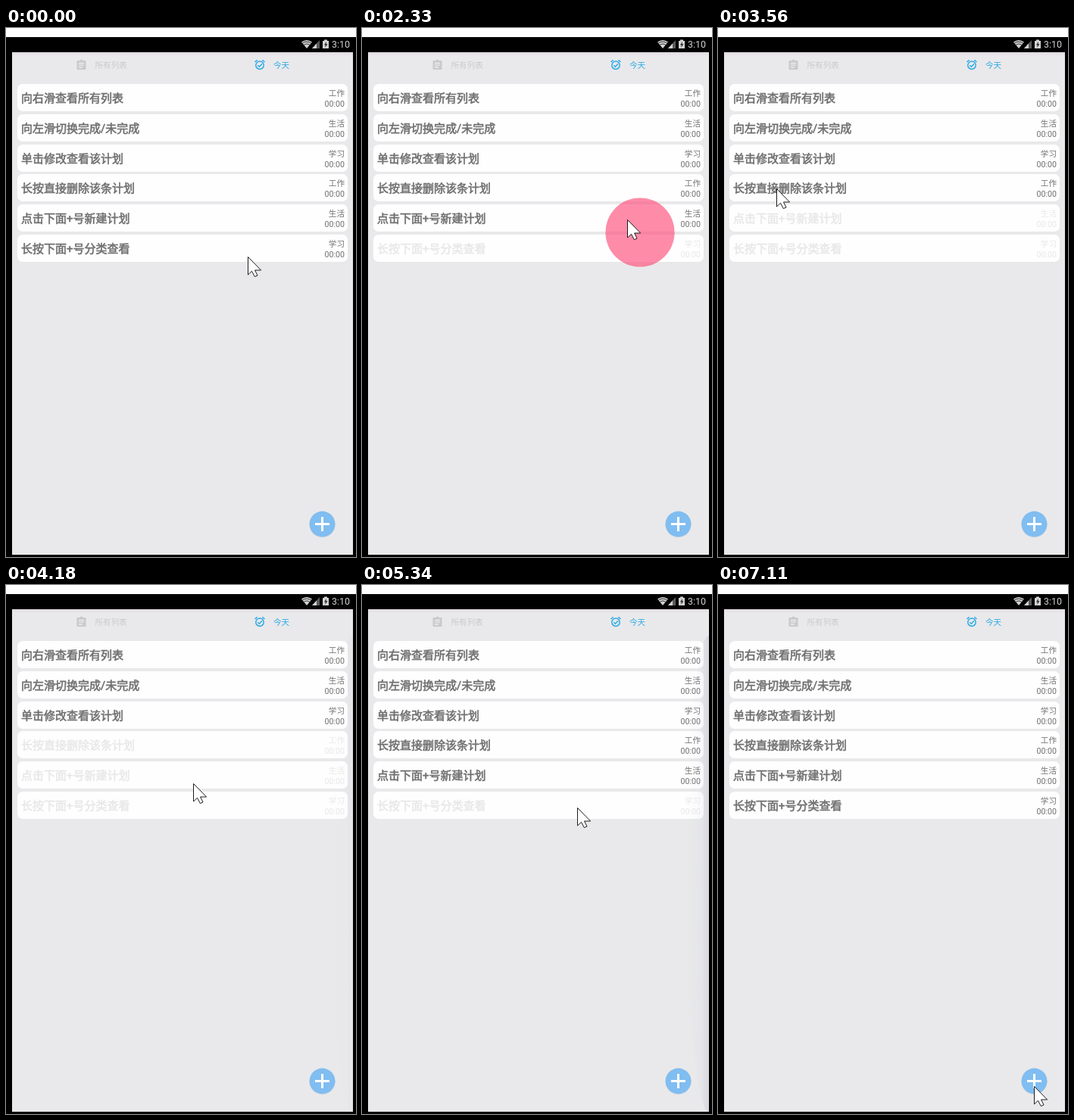
An HTML page that plays this animation: 462x699 px, repeating every 8 s.

```html
<!DOCTYPE html>
<html lang="zh">
<head>
<meta charset="utf-8">
<style>
  html, body { margin: 0; width: 100%; height: 100%; overflow: hidden; background: #000; }
  svg { display: block; font-family: Roboto, "Noto Sans CJK SC", "Noto Sans CJK", sans-serif; }
  .title { font-size: 15px; stroke: currentColor; stroke-width: .6; }
  .small { font-size: 10.6px; }
  .end { text-anchor: end; }
  .line { fill: none; stroke-width: 1.5; }
  .words { fill: currentColor; }
</style>
</head>
<body>
<svg width="462" height="699" viewBox="0 0 462 699">
  <defs>
    <linearGradient id="edge" gradientUnits="userSpaceOnUse" x1="428" x2="458" y1="0" y2="0">
      <stop stop-color="#a4abc0" stop-opacity="0"/>
      <stop offset=".65" stop-color="#a4abc0" stop-opacity=".12"/>
      <stop offset="1" stop-color="#8f98b0" stop-opacity=".45"/>
    </linearGradient>
    <linearGradient id="shade" x2="0" y2="1">
      <stop stop-color="#e2dae1"/>
      <stop offset="1" stop-color="#e9e9eb"/>
    </linearGradient>
  </defs>
  <rect width="462" height="12" fill="#fefefe"/>
  <rect x="8" y="32" width="450" height="664" fill="#e9e9eb"/>
  <rect x="8" y="32" width="450" height="5" fill="url(#shade)"/>

  <!-- status bar -->
  <g fill="#d2d2d2">
    <path d="M390 18.6Q397 13.2 404 18.6L397 27Z"/>
    <path d="M391 20.3Q397 15.8 403 20.3M393 22.6Q397 19.4 401 22.6" fill="none" stroke="#333"/>
    <path d="M404 27L414 16V27Z" fill="#5c5c5c"/>
    <path d="M404 27L410 20.4V27Z"/>
    <path d="M418 17H420V15.5H424V17H426V27H418Z"/>
    <path d="M423 18L420 22.5H422L421 26L424.5 21.3H422.5Z" fill="#222"/>
    <text x="454" y="26" class="end" font-size="12.4">3:10</text>
  </g>

  <!-- tabs -->
  <g fill="#cacacd">
    <path d="M94.5 43H97.5Q99.5 40.2 101.5 43H104.5Q105.5 43 105.5 44V54Q105.5 55 104.5 55H94.5Q93.5 55 93.5 54V44Q93.5 43 94.5 43Z"/>
    <path d="M96 46.5H103M96 49.2H103M96 52H101" stroke="#ececee" stroke-width="1.3"/>
    <text x="117.5" y="52.7" class="small">所有列表</text>
  </g>
  <g fill="#2eaae6" stroke="#2eaae6">
    <circle cx="335" cy="49.2" r="5.2" class="line"/>
    <path d="M332.3 49.2L334.4 51.2L338 47.3M328.5 45L331.6 42.4M341.5 45L338.4 42.4" class="line"/>
    <text x="353" y="52.7" class="small" stroke="none">今天</text>
  </g>

  <g id="rows"></g>
  <ellipse id="glow" cx="458" cy="381.5" rx="30" ry="314.5" fill="url(#edge)"/>
  <path d="M458 31H462V699H458Z"/>

  <!-- add button -->
  <circle cx="417.5" cy="656" r="17.2" fill="#d3d7dc"/>
  <circle cx="417.5" cy="655.5" r="16.9" fill="#80bdf1"/>
  <path d="M408 655.5H427M417.5 646V665" stroke="#fff" stroke-width="3"/>

  <g id="pointer">
    <circle id="press" cx="17" cy="17" r="45.6" fill="#ff4070" fill-opacity=".6"/>
    <path d="M.5 .5V24L5.5 19.3L9.3 26.6L13 25L9.5 18H17.6Z" fill="#fff" stroke="#1c1c1c"/>
  </g>
</svg>
<script>
const LOOP = 8000, STEP = 77.3;     // the screen refreshes once per step
const ROW_TOP = 74, PITCH = 39.75;
const PRESS_X = 350, SWIPE_STEPS = 3, SPEED = 25;
const titles = ['向右滑查看所有列表', '向左滑切换完成/未完成', '单击修改查看该计划',
                '长按直接删除该条计划', '点击下面+号新建计划', '长按下面+号分类查看'];
const kinds = ['工作', '生活', '学习'];

// each swipe runs left from PRESS_X and ends at [step, x, y]
const swipes = [[4, 240, 291], [22, 130, 253], [35, 77, 212],
                [43, 247, 262], [53, 250, 212], [58, 284, 294]];
const toggles = swipes.map(([step, , y]) => ({ step: step + 1, row: Math.floor((y - ROW_TOP) / PITCH) }));
const path = [
  { step: -2, x: 319, y: 302 },
  { step: -1, x: 335, y: 300 },
  ...swipes.flatMap(([step, x, y]) => [{ step: step - SWIPE_STEPS, x: PRESS_X, y, down: true }, { step, x, y }]),
  { step: 75, x: 416, y: 661, down: true },
  { step: 76, x: 417, y: 662 }
];
const $ = id => document.getElementById(id);

$('rows').innerHTML = titles.map((title, i) => `
  <g transform="translate(0 ${Math.round(ROW_TOP + PITCH * i)})">
    <rect x="15" width="436" height="36" rx="7" fill="#fefefe"/>
    <g class="words">
      <text x="20" y="24" class="title">${title}</text>
      <text x="447" y="15.5" class="small end">${kinds[i % 3]}</text>
      <text x="447" y="29.8" class="small end">00:00</text>
    </g>
  </g>`).join('');
const words = document.querySelectorAll('.words');

function stepAt(t) {
  if (t < 70) return -2;
  if (t < 870) return -1;
  if (t >= 7110) return 76;
  return Math.min(75, Math.floor((t - 850) / STEP));
}

// Swipes are linear; moves between them slow down and then wait for the next press.
function pointerAt(step) {
  const a = path.findLast(p => p.step <= step);
  const b = path.find(p => p.step > step) || a;
  const gap = b.step - a.step || 1;
  const travel = Math.min(gap, Math.hypot(b.x - a.x, b.y - a.y) / SPEED);
  const f = a.down ? (step - a.step) / gap : 1 - (1 - Math.min(1, (step - a.step) / travel || 0)) ** 2;
  return { x: a.x + (b.x - a.x) * f, y: a.y + (b.y - a.y) * f, down: a.down };
}

function draw(now) {
  const step = stepAt(now % LOOP);
  const { x, y, down } = pointerAt(step);
  $('pointer').setAttribute('transform', `translate(${Math.round(x)} ${Math.round(y)})`);
  $('press').setAttribute('visibility', down ? 'visible' : 'hidden');

  const past = toggles.filter(t => t.step <= step);
  words.forEach((row, i) => {
    const done = past.filter(t => t.row === i).length % 2;
    row.style.color = done ? '#e8e8e8' : '#707070';
  });
  const since = past.length ? step - past[past.length - 1].step : Infinity;
  $('glow').setAttribute('opacity', Math.max(0, 1 - since / 8));
  requestAnimationFrame(draw);
}
requestAnimationFrame(draw);
</script>
</body>
</html>
```
